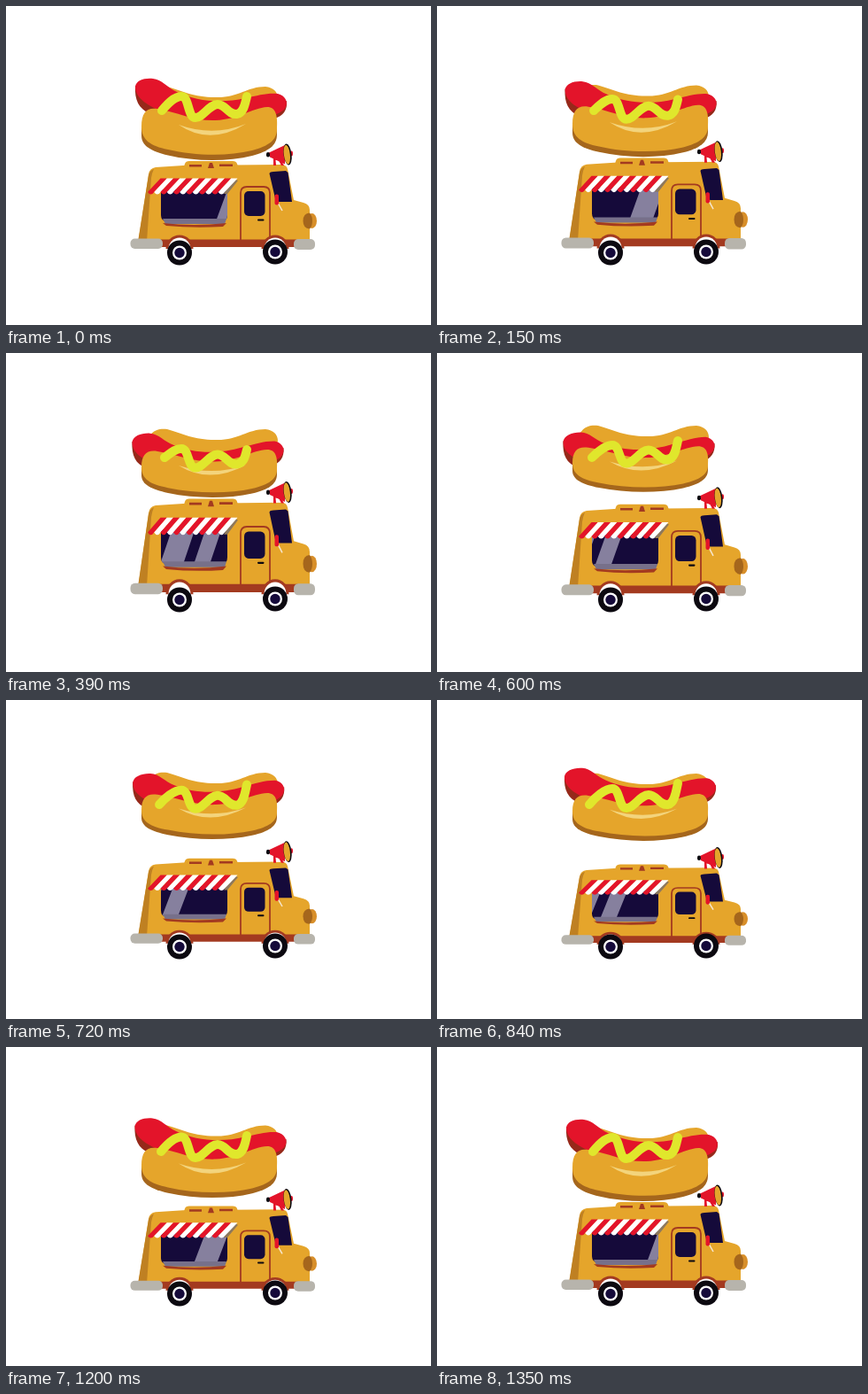
Write an HTML page that moves like this. It is 480x360 px and loops after 1470 ms.

```html
<!DOCTYPE html>
<html lang="en">
<head>
<meta charset="utf-8">
<title>Hot dog truck</title>
<style>
html, body { margin: 0; width: 100%; height: 100%; overflow: hidden; background: #fff; }
svg { display: block; width: 100vw; height: 100vh; }
.tan { fill: #e5a52b; }
.brown { fill: #a5661c; }
.rust { fill: #a33a20; }
.red { fill: #e3142a; }
.navy { fill: #150a3a; }
.ink { fill: #0c0910; }
.gray { fill: #b7b4ac; }
</style>
</head>
<body>
<svg viewBox="0 0 480 360">
  <defs>
    <clipPath id="pane"><path d="M175 207H250V236Q250 243 243 243H182Q175 243 175 236Z"/></clipPath>
  </defs>

  <g id="body">
    <path class="tan" d="M200 184L202 178Q203 175 207 175H256Q260 175 261 178L263 184Z"/>
    <path class="tan" d="M149 268L161 190Q162 183 169 182L200 180L310 179Q317 179 318 184L325 219L336 222Q343 224 343 230V268Z"/>
    <path fill="#bf8022" d="M149 266L161 191Q162 186 167 184Q165 188 164 194L159 266Z"/>
    <path class="rust" d="M207 179H221V181.500H207ZM241 178.500H256V181H241ZM228 183L230 177H233L235 183Z"/>

    <path class="navy" d="M175 207H250V236Q250 243 243 243H182Q175 243 175 236Z"/>
    <g clip-path="url(#pane)">
      <path id="glare" fill="#86809e" d="M0 243L14 205H40L26 243ZM38 243L52 205H70L56 243Z"/>
    </g>
    <path fill="#77708a" d="M177 240H249L247 246H180Z"/>
    <path class="rust" d="M177 245Q212 249 249 245L245 249Q212 251 181 248Z"/>
    <path fill="#8d785c" d="M257 195L262 197L250 212H246Z"/>
    <g id="awning"></g>

    <path fill="none" stroke="#a33a20" stroke-width="1.800" d="M265 266V211Q265 204 272 204H291Q298 204 298 211V266"/>
    <rect class="navy" x="269" y="209" width="23.500" height="28" rx="5"/>
    <rect class="ink" x="284" y="240.500" width="7.500" height="2" rx="1"/>
    <path class="navy" d="M297.500 189Q298 187 302 187L316 186L318.500 188L323 221H309Q305 221 304 217Z"/>
    <path fill="none" stroke="#f6e7d0" stroke-width="1.500" d="M307 222L312 231"/>
    <rect class="red" x="303.500" y="212.500" width="4.500" height="12" rx="2"/>
    <ellipse fill="#d88f2a" cx="345.500" cy="242.500" rx="5.500" ry="8.500"/>
    <path class="brown" d="M343 233.500Q335.500 234 335.500 242.500T343 251.500Q346 248 346 242.500T343 233.500Z"/>

    <path class="rust" d="M172 263.500H330V272H172Z"/>
    <g id="arches"></g>
    <rect class="gray" x="140.500" y="262.500" width="36.500" height="11.500" rx="5"/>
    <rect class="gray" x="325" y="263" width="24" height="12" rx="5"/>
  </g>
  <g id="wheels"></g>

  <g id="horn">
    <path class="red" d="M302 171H309L314 180H311L308 175H305V180H302Z"/>
    <path fill="#fff" d="M304.500 174H308L310 179H305Z"/>
    <path class="red" d="M297 165.500L315 157V178.500L298 170.500Z"/>
    <rect class="ink" x="294" y="165" width="4" height="5.500" rx="2"/>
    <ellipse class="red" cx="322.500" cy="166.500" rx="1.500" ry="3"/>
    <g transform="rotate(-7 318 167.500)">
      <ellipse class="ink" cx="318" cy="167.500" rx="4.500" ry="12"/>
      <ellipse class="tan" cx="317.300" cy="167.500" rx="3.500" ry="11"/>
    </g>
  </g>

  <g id="backBun">
    <path class="tan" d="M160 116C157 96 169 89 182 91C200 96 212 103 236 103C262 104 272 91 293 91C302 92 307 97 307 104L300 126H163Z"/>
  </g>
  <g id="sausage">
    <path fill="#96291a" d="M146 90C145 106 150 116 162 121L185 116L160 95ZM317 107C318 118 313 124 303 127L292 118Z"/>
    <path class="red" d="M146 91C147 84 156 81 166 82C176 83 182 92 193 97C215 108 245 110 270 104C285 101 295 98 307 99C315 101 319 108 316 114C313 121 300 124 285 128C250 139 205 132 178 120C162 113 146 105 146 91Z"/>
  </g>
  <g id="bun">
    <path class="brown" d="M153 135V146C153 158 164 164 183 168.500C213 175.500 250 176 278 169C297 164 306 157 306 145V135Z"/>
    <path class="tan" d="M153 136C153 120 159 114 171 116C195 120 211 130 237 129C262 128 278 115 295 114C305 114 307 124 306 139C306 151 297 158 278 163C250 170 213 169 183 162C163 158 153 151 153 136Z"/>
    <path fill="#f3d47c" d="M195 134Q230 158 271 133Q234 148 195 134Z"/>
  </g>
  <path id="mustard" fill="none" stroke="#e0e72c" stroke-width="10" stroke-linecap="round" stroke-linejoin="round"/>
</svg>

<script>
const $ = id => document.getElementById(id);
const LOOP = 1470, STEP = 30, LAST = 1350;
const times = [0, 270, 390, 600, 840, 1050, LAST];

// Offsets from the rest pose at each key time.
const keys = {
  roof:   [0, -6, -10, -4, 10, 8, 0],
  bunTop: [0, -4, -5, -9, -8, -4, 0],
  bunLow: [0, -7, -11, -17, -15, -8, 0],
  back:   [0, -3, -5, -9, -8, -5, 0],
  tail:   [0, 6, 9, 8, -5, -3, 0],
  tip:    [0, 0, 0, -5, -11, -6, 0],
  slide:  [0, -2.5, -3.5, -3.5, -2, -1, 0],
  start:  [0, 2, 3, -1, -4, -2, 0],
  peak:   [0, 5, 6, 2, -2, -1, 0],
  end:    [0, 6, 7, -3, -8, -4, 0],
  glare:  [237, 200, 174, 140, 146, 186, 237]
};

function slope(v, i) {
  const a = Math.max(i - 1, 0), b = Math.min(i + 1, v.length - 1);
  return (v[b] - v[a]) / (times[b] - times[a]);
}

// Cubic Hermite curve through the keys.
function at(v, t) {
  let i = 0;
  while (i < times.length - 2 && t >= times[i + 1]) i++;
  const h = times[i + 1] - times[i], u = (t - times[i]) / h, w = 1 - u;
  return v[i] * w * w * (1 + 2 * u) + v[i + 1] * u * u * (3 - 2 * u)
    + h * u * w * (slope(v, i) * w - slope(v, i + 1) * u);
}

// Vertical map that moves y1 by d1 and y2 by d2.
function stretch(y1, d1, y2, d2) {
  const s = 1 + (d2 - d1) / (y2 - y1);
  return `matrix(1 0 0 ${s} 0 ${y1 + d1 - y1 * s})`;
}

const move = (id, value) => $(id).setAttribute('transform', value);

function buildAwning() {
  const n = 12, w = 87 / n;
  let out = '';
  for (let i = 0; i < n; i++) {
    const x = 160 + i * w;
    out += `<path fill="${i % 2 ? '#fff' : '#e3142a'}" d="M${x + 14.5} 194.500h${w}L${x + w} 210q${-w / 2} 5 ${-w} 0Z"/>`;
  }
  $('awning').innerHTML = out;
}

function buildWheels() {
  const hubs = [[196, 278.5], [304, 277.5]];
  const disc = (x, y, r, c) => `<circle cx="${x}" cy="${y}" r="${r}" fill="${c}"/>`;
  const arch = (x, r, c) => `<path fill="${c}" d="M${x - r} 274a${r} ${r} 0 0 1 ${2 * r} 0Z"/>`;
  $('arches').innerHTML = hubs.map(([x]) => arch(x, 15.5, '#a33a20') + arch(x, 12.5, '#fff')).join('');
  $('wheels').innerHTML = hubs.map(([x, y]) =>
    disc(x, y, 14, '#0c0910') + disc(x, y, 8, '#fff') + disc(x, y, 5.7, '#150a3a')).join('');
}

function draw(t) {
  const p = {};
  for (const k in keys) p[k] = at(keys[k], t);

  move('body', stretch(181, p.roof, 295, 0));
  move('horn', `translate(0 ${p.roof * 1.05})`);
  move('glare', `translate(${p.glare} 0)`);
  move('backBun', `translate(0 ${p.back})`);
  move('bun', stretch(115, p.bunTop, 173, p.bunLow));

  const k = (p.tip - p.tail) / 155;
  move('sausage', `matrix(1 ${k} 0 1 ${p.slide} ${p.tail - 160 * k})`);

  const s = p.start, a = p.peak, e = p.end, m = e / 2;
  $('mustard').setAttribute('d',
    `M${176 + s} 118C${182 + s} ${111 + a / 2} 190 ${102 + a} 198 ${102 + a}` +
    `C207 ${102 + a} 205 ${126 + m} 214 ${126 + m}` +
    `C222 ${126 + m} 230 ${111 + m} 239 ${111 + m}` +
    `C248 ${111 + m} 251 ${123 + m} 261 ${122 + m}` +
    `C269 ${120 + m} 270 ${110 + e} 272 ${102 + e}`);
}

const t0 = performance.now();
function tick() {
  const t = (performance.now() - t0) % LOOP;
  draw(Math.min(Math.floor(t / STEP) * STEP, LAST));
  requestAnimationFrame(tick);
}

buildAwning();
buildWheels();
tick();
</script>
</body>
</html>
```
